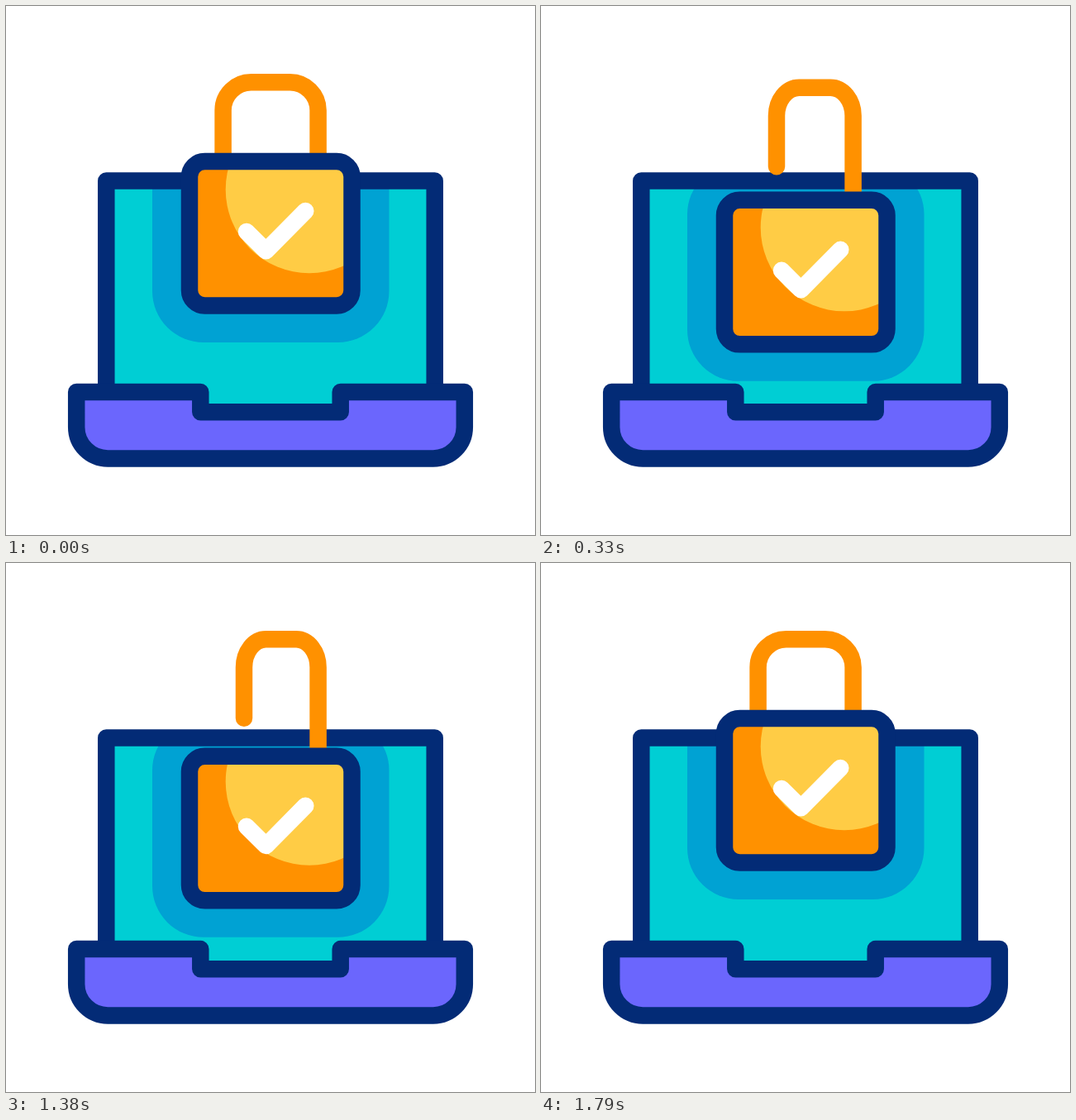
Write an HTML page that moves like this. It is 640 px wide and 640 px high and loops after 2.04 s.

```html
<!DOCTYPE html>
<html lang="en">
<head>
<meta charset="utf-8">
<title>Laptop lock</title>
<style>
  html, body { margin: 0; width: 100%; height: 100%; overflow: hidden; background: #fff; }
  svg { display: block; width: 100vw; height: 100vh; }
  .line { stroke: #032b76; stroke-width: 20.5; stroke-linejoin: round; }
  .stroke { fill: none; stroke-width: 20.5; stroke-linecap: round; stroke-linejoin: round; }
</style>
</head>
<body>
<svg viewBox="0 0 640 640">
  <defs>
    <clipPath id="screen"><rect x="121.5" y="211.5" width="397" height="280"/></clipPath>
    <clipPath id="face"><rect x="222" y="188" width="196.5" height="174.5" rx="18.5"/></clipPath>
  </defs>

  <rect x="121.5" y="211.5" width="397" height="280" fill="#00ced4"/>
  <g clip-path="url(#screen)">
    <rect id="halo" x="177" y="143" width="286.5" height="264" rx="62" fill="#00a2d3"/>
  </g>
  <path class="line" fill="none" d="M121.3 467V211.5H518.7V467"/>
  <path class="line" fill="#6b66fd"
    d="M85.2 467H235.3V491.2H404.7V467H554.8V509.5A38 38 0 0 1 516.8 547.5H123.2A38 38 0 0 1 85.2 509.5Z"/>

  <path id="shackle" class="stroke" stroke="#ff9100"/>

  <g id="lock">
    <g clip-path="url(#face)">
      <rect x="222" y="188" width="197" height="175" fill="#ff9100"/>
      <circle id="shine" cx="367" cy="222" r="101.3" fill="#ffcc45"/>
    </g>
    <rect class="line" x="222" y="188" width="196.5" height="174.5" rx="18.5" fill="none"/>
    <path class="stroke" stroke="#fff" d="M291 273L314.5 296.3L362.3 248"/>
  </g>
</svg>
<script>
  const LOOP = 2040, STEP = 125 / 3;
  const DROP = 50.5, SHINE_DROP = 48.5;
  const OPEN_END = 15, CLOSE_START = 29, CLOSE_STEPS = 14;
  const $ = id => document.getElementById(id);
  const clamp = v => Math.min(1, Math.max(0, v));

  function bezier(x1, y1, x2, y2) {
    const at = (a, b, t) => 3 * a * (1 - t) ** 2 * t + 3 * b * (1 - t) * t * t + t ** 3;
    return x => {
      if (x <= 0) return 0;
      if (x >= 1) return 1;
      let lo = 0, hi = 1;
      for (let i = 0; i < 30; i++) {
        const mid = (lo + hi) / 2;
        if (at(x1, x2, mid) < x) lo = mid; else hi = mid;
      }
      return at(y1, y2, lo);
    };
  }

  const fall = bezier(.1, .85, .35, .95);
  const release = bezier(.2, .2, .4, 1);
  const shut = bezier(.45, 0, .75, .675);

  // drop: lock body, swing: shackle, shine: highlight on the lock
  function pose(step) {
    if (step <= CLOSE_START) {
      const u = clamp(step / OPEN_END);
      const p = fall(u);
      return { drop: DROP * p, swing: release(u), shine: Math.min(SHINE_DROP, 49.6 * p) };
    }
    const u = clamp((step - CLOSE_START) / CLOSE_STEPS);
    const left = 1 - shut(u);
    return { drop: DROP * left, swing: left, shine: SHINE_DROP * (1 - shut(clamp(u + .045))) };
  }

  function shacklePath(swing, y) {
    const left = 262.6 + 28 * swing, right = 377.6;
    const rx = 34 * (right - left) / 115;
    const top = 92.3 + y, bend = top + 34;
    return `M${left} ${187.7 + y}V${bend}A${rx} 34 0 0 1 ${left + rx} ${top}` +
      `H${right - rx}A${rx} 34 0 0 1 ${right} ${bend}V${236 + y}`;
  }

  function draw(ms) {
    // 24 steps a second, on a 10 ms clock
    const tick = Math.floor((ms % LOOP) / 10) * 10;
    const { drop, swing, shine } = pose(Math.floor((tick + 4) / STEP));
    const shift = `translate(0 ${drop})`;
    $("halo").setAttribute("transform", shift);
    $("lock").setAttribute("transform", shift);
    $("shine").setAttribute("cy", 222 + shine - drop);
    $("shackle").setAttribute("d", shacklePath(swing, drop - DROP * swing));
  }

  const start = performance.now();
  function loop() {
    draw(performance.now() - start);
    requestAnimationFrame(loop);
  }
  loop();
</script>
</body>
</html>
```
